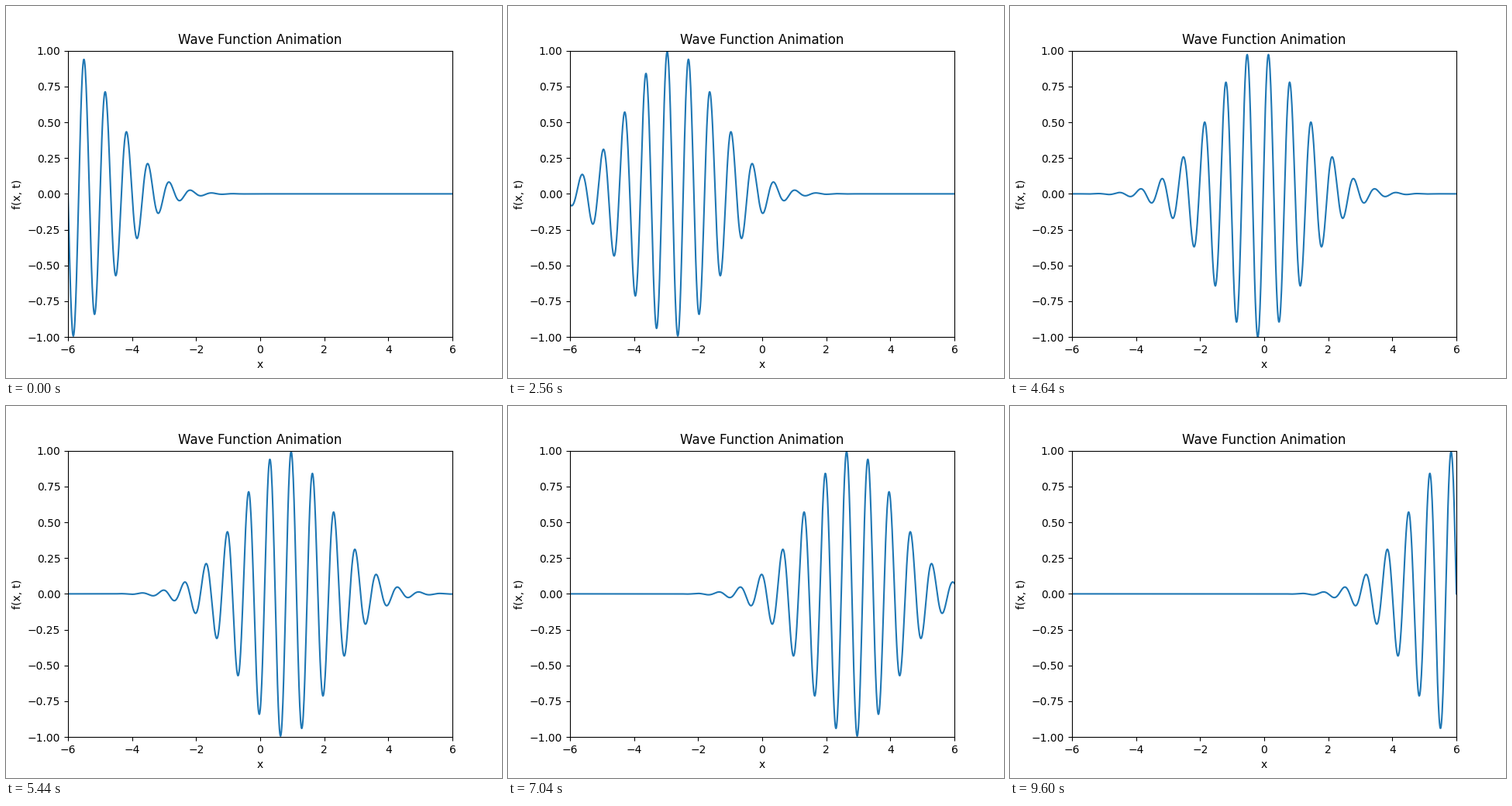
A matplotlib script that plays this animation: 640x480 px, repeating every 9760 ms.

```python
import numpy as np
import matplotlib.pyplot as plt
from matplotlib.animation import FuncAnimation

FRAMES = 61
INTERVAL = 160  # ms


def f(x, t):
    """Gaussian packet travelling faster than its carrier wave."""
    return np.exp(-(x / 2 - 3 * t) ** 2) * np.sin(3 * np.pi * (x - t))


x = np.linspace(-6, 6, 1001)
times = np.linspace(-1, 1, FRAMES)

fig, ax = plt.subplots(figsize=(6.4, 4.8), dpi=100)
ax.set(xlim=(-6, 6), ylim=(-1, 1), xlabel="x", ylabel="f(x, t)",
       title="Wave Function Animation")
line, = ax.plot(x, f(x, times[0]))


def update(i):
    line.set_ydata(f(x, times[i]))
    return line,


anim = FuncAnimation(fig, update, frames=FRAMES, interval=INTERVAL,
                     repeat=True, repeat_delay=0)
plt.show()
```
